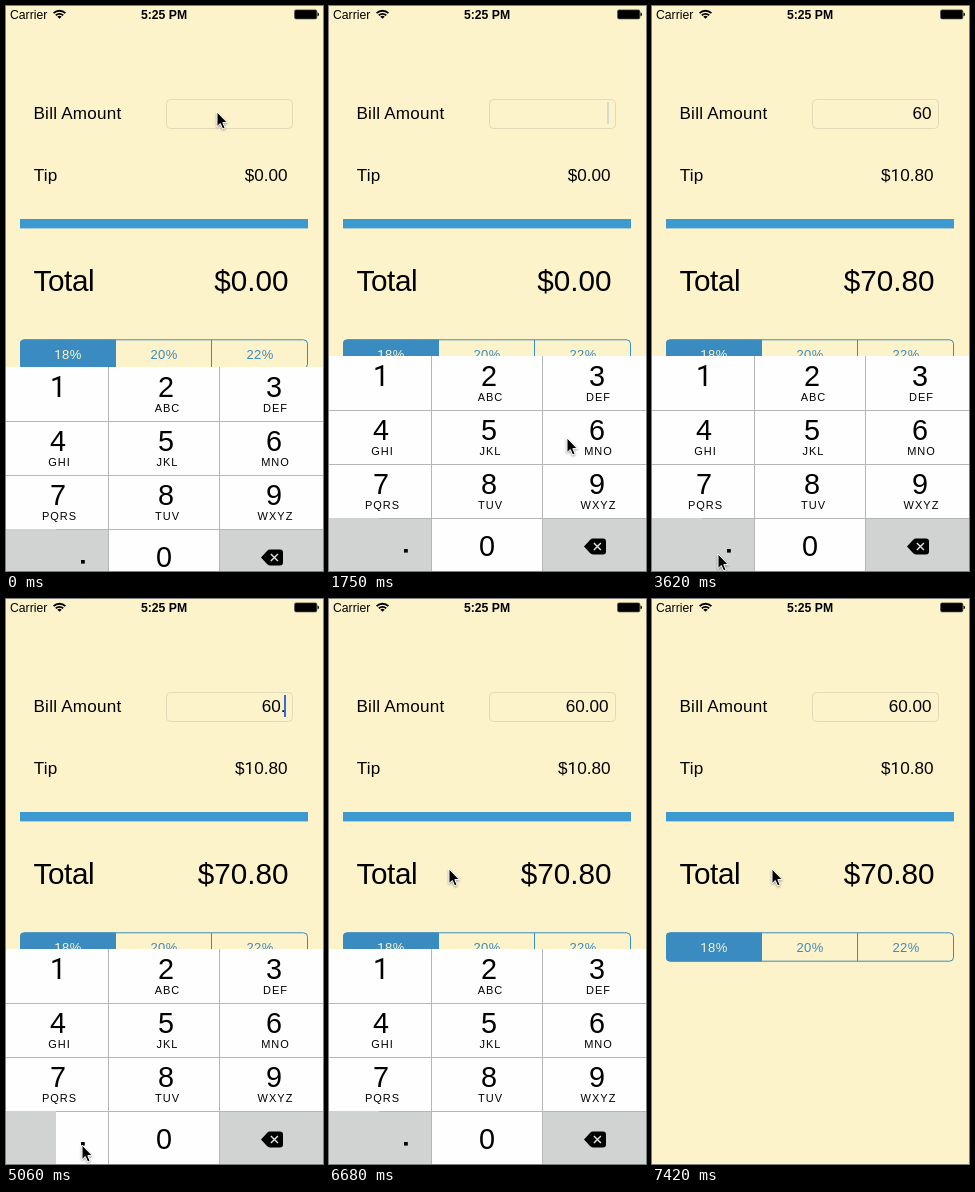
Recreate the animation shown at these times as an HTML page. Size 317 by 565 pixels, loop 8 s.

```html
<!DOCTYPE html>
<html lang="en">
<head>
<meta charset="utf-8">
<title>Tip calculator</title>
<style>
  html, body { margin: 0; width: 100%; height: 100%; overflow: hidden; background: #fdf3ca; }
  svg { display: block; width: 317px; height: 565px; font-family: "Liberation Sans", Arial, sans-serif; }
  .one { font-family: Roboto, sans-serif; }
  .body { font-size: 17.1px; }
  .name { letter-spacing: .22px; }
  .big { font-size: 29.7px; }
  .status { font-size: 12.2px; }
  .seg { font-size: 13px; letter-spacing: .4px; fill: #3a8bbf; }
  .on { fill: #fdf3ca; }
  .digit { font-size: 28.8px; }
  .abc { font-size: 11px; letter-spacing: 1px; }
  .end { text-anchor: end; }
  .mid { text-anchor: middle; }
  .rule { fill: #b4b6b8; }
  .grey { fill: #d1d3d3; }
</style>
</head>
<body>
<svg viewBox="0 0 317 565">
  <rect width="317" height="565" fill="#fdf3ca"/>

  <g id="page">
    <path d="M47.6 7.2A8.3 8.3 0 0 1 59.4 7.2M49.8 9.4A5.2 5.2 0 0 1 57.2 9.4"
      fill="none" stroke="#000" stroke-width="1.8"/>
    <path d="M53.5 12.8L51.3 10.7A3.2 3.2 0 0 1 55.7 10.7Z"/>
    <rect x="288.6" y="3.9" width="22.2" height="9" rx="1.4" stroke="#444" stroke-width=".7"/>
    <path d="M311.5 6.6q1.5 0 1.5 1.8t-1.5 1.8z"/>

    <rect x="160.5" y="93.500" width="126" height="29" rx="4" fill="#fdf3ca" stroke="#e2d9b9"/>
    <rect x="14" y="213" width="288" height="9.400" fill="#3d9ad1"/>

    <path d="M110 333.500H18a4 4 0 0 0-4 4v21a4 4 0 0 0 4 4h92z" fill="#3a8bbf"/>
    <rect x="14.500" y="333.800" width="287" height="28.400" rx="4" fill="none" stroke="#3a8bbf"/>
    <path d="M205.500 334v28" stroke="#3a8bbf"/>
  </g>

  <rect id="caret" x="278" y="96" width="2" height="22" fill="#3a6ad8"/>

  <g id="pad">
    <rect width="317" height="216" fill="#fefefe"/>
    <rect class="grey" y="162" width="102" height="54"/>
    <rect class="grey" x="213" y="162" width="104" height="54"/>
    <rect class="grey" id="six" x="213" y="54" width="104" height="54"/>
    <rect class="grey" id="zero" x="103" y="162" width="110" height="54"/>
    <rect id="dot" x="50" y="162" width="52" height="54" fill="#fefefe"/>
    <g class="rule">
      <rect y="54" width="317" height="1"/>
      <rect y="108" width="317" height="1"/>
      <rect x="50" y="162" width="267" height="1"/>
      <rect x="102" width="1" height="216"/>
      <rect x="213" width="1" height="216"/>
    </g>
    <rect x="75" y="193" width="3.800" height="3.600"/>
    <path d="M255 190.500l6-6.600q1.300-1.400 3-1.400h10q3 0 3 3v10q0 3-3 3h-10q-1.700 0-3-1.400z"/>
    <path d="M264.900 187l7 7m0-7l-7 7" stroke="#e4e5e6" stroke-width="1.400"/>
  </g>

  <path id="mouse" d="M0 0V14.600L3.300 11.500L5.700 17L8.100 16L5.800 10.600H10.300Z"
    stroke="#fff" style="filter:drop-shadow(0 1px 1px #0006)"/>
</svg>
<script>
const LOOP = 8000, TICK = 145;
const BLINK = 1090, CARET_END = 6600;
const $ = id => document.getElementById(id);
const page = $('page'), pad = $('pad');

function label(parent, str, x, y, cls) {
  const el = document.createElementNS('http://www.w3.org/2000/svg', 'text');
  el.setAttribute('x', x);
  el.setAttribute('y', y);
  el.setAttribute('class', cls);
  // The footless "1" comes from a second face.
  el.innerHTML = str.replace(/1/g, '<tspan class="one">1</tspan>');
  parent.append(el);
  return el;
}

// Each [time, value] holds until the next one.
function hold(el, prop, steps) {
  const frames = steps.map(([t, v]) => ({ [prop]: v, offset: t / LOOP, easing: 'steps(1, end)' }));
  frames.push({ [prop]: steps.at(-1)[1], offset: 1 });
  el.animate(frames, { duration: LOOP, iterations: Infinity });
}

const shift = (x, y) => `translate(${x.toFixed(1)}px, ${y.toFixed(1)}px)`;

// Show a run of values in one place, each from its own time on.
function readout(list, x, y, cls) {
  list.forEach(([t, str], i) => {
    const steps = t ? [[0, 0], [t, 1]] : [[0, 1]];
    if (list[i + 1]) steps.push([list[i + 1][0], 0]);
    hold(label(page, str, x, y, cls + ' end'), 'opacity', steps);
  });
}

// Fixed labels
label(page, 'Carrier', 4, 12.5, 'status');
label(page, '5:25 PM', 158, 12.5, 'status mid').setAttribute('font-weight', 'bold');
label(page, 'Bill Amount', 27.5, 113, 'body name');
label(page, 'Tip', 27.8, 175, 'body name');
label(page, 'Total', 27.5, 285, 'big').style.letterSpacing = '-.4px';
['18%', '20%', '22%'].forEach((s, i) =>
  label(page, s, 62 + i * 96, 353, 'seg mid' + (i ? '' : ' on')));

['', 'ABC', 'DEF', 'GHI', 'JKL', 'MNO', 'PQRS', 'TUV', 'WXYZ'].forEach((s, i) => {
  const x = 52 + i % 3 * 108, y = Math.floor(i / 3) * 54;
  label(pad, String(i + 1), x, y + 29.7, 'digit mid');
  label(pad, s, x + 1.5, y + 45, 'abc mid');
});
label(pad, '0', 158, 199.7, 'digit mid');

// Taps: key, character, down, up
const taps = [
  ['six', '6', 1900, 2050],
  ['zero', '0', 2800, 2940],
  ['dot', '.', 4910, 5500],
  ['zero', '0', 5500, 5650],
  ['zero', '0', 5940, 6090]
];
const typed = ([, , down, up]) => Math.min(up, down + 150);

for (const id of ['six', 'zero', 'dot']) {
  const own = taps.filter(tap => tap[0] === id);
  hold($(id), 'opacity', [[0, 0], ...own.flatMap(([, , down, up]) => [[down, 1], [up, 0]])]);
}

let field = '';
const bill = [[0, ''], ...taps.map(tap => [typed(tap), field += tap[1]])];
const money = rate => bill.map(([t, s]) => [t, '$' + (s * rate).toFixed(2)]);
readout(bill, 279.5, 113, 'body');
readout(money(.18), 281.5, 175, 'body');
readout(money(1.18), 282.5, 285, 'big');

// The caret blinks, and starts over at each touch.
const restarts = [290, ...taps.flatMap(tap => [tap[2], typed(tap)]), CARET_END];
const blink = [[0, 0]];
restarts.slice(0, -1).forEach((start, i) => {
  for (let t = start; t < restarts[i + 1]; t += BLINK / 8) {
    const phase = (t - start) % BLINK;
    blink.push([t, Math.max(0, Math.min(1, (300 - phase) / 140))]);
  }
});
hold($('caret'), 'opacity', [...blink, [CARET_END, 0]]);

// The keypad settles, then slides away.
const slide = [0, 1, 2, 3].map(i => [i * 150, shift(0, 350 + Math.round(11 * Math.exp(-1.5 * i)))]);
for (let i = 1; i <= 3; i++) {
  slide.push([6985 + i * TICK, shift(0, 566 - 216 * (1 - i / 3) ** 2)]);
}
hold(pad, 'transform', slide);

// Pointer moves: first and last step, bend point, end point
const moves = [
  [720, 1750, 150, 280, 238, 432],
  [2350, 2800, 200, 515, 175, 541],
  [3090, 3240, 130, 545, 86, 547],
  [3480, 3620, 74, 548, 66, 548],
  [4470, 4910, 70, 548, 76, 546],
  [5500, 5650, 140, 544, 155, 542],
  [6240, 6680, 145, 400, 120, 270]
];
let x = 211, y = 106;
const path = [[0, shift(x, y)]];
for (const [from, to, bx, by, ex, ey] of moves) {
  const n = Math.round((to - from) / TICK);
  for (let i = 0; i <= n; i++) {
    const k = (i + 1) / (n + 1), u = k * k * (3 - 2 * k);
    const mix = (a, b, c) => (1 - u) ** 2 * a + 2 * u * (1 - u) * b + u * u * c;
    path.push([from + (to - from) * i / n, shift(mix(x, bx, ex), mix(y, by, ey))]);
  }
  [x, y] = [ex, ey];
}
hold($('mouse'), 'transform', path);
</script>
</body>
</html>
```
